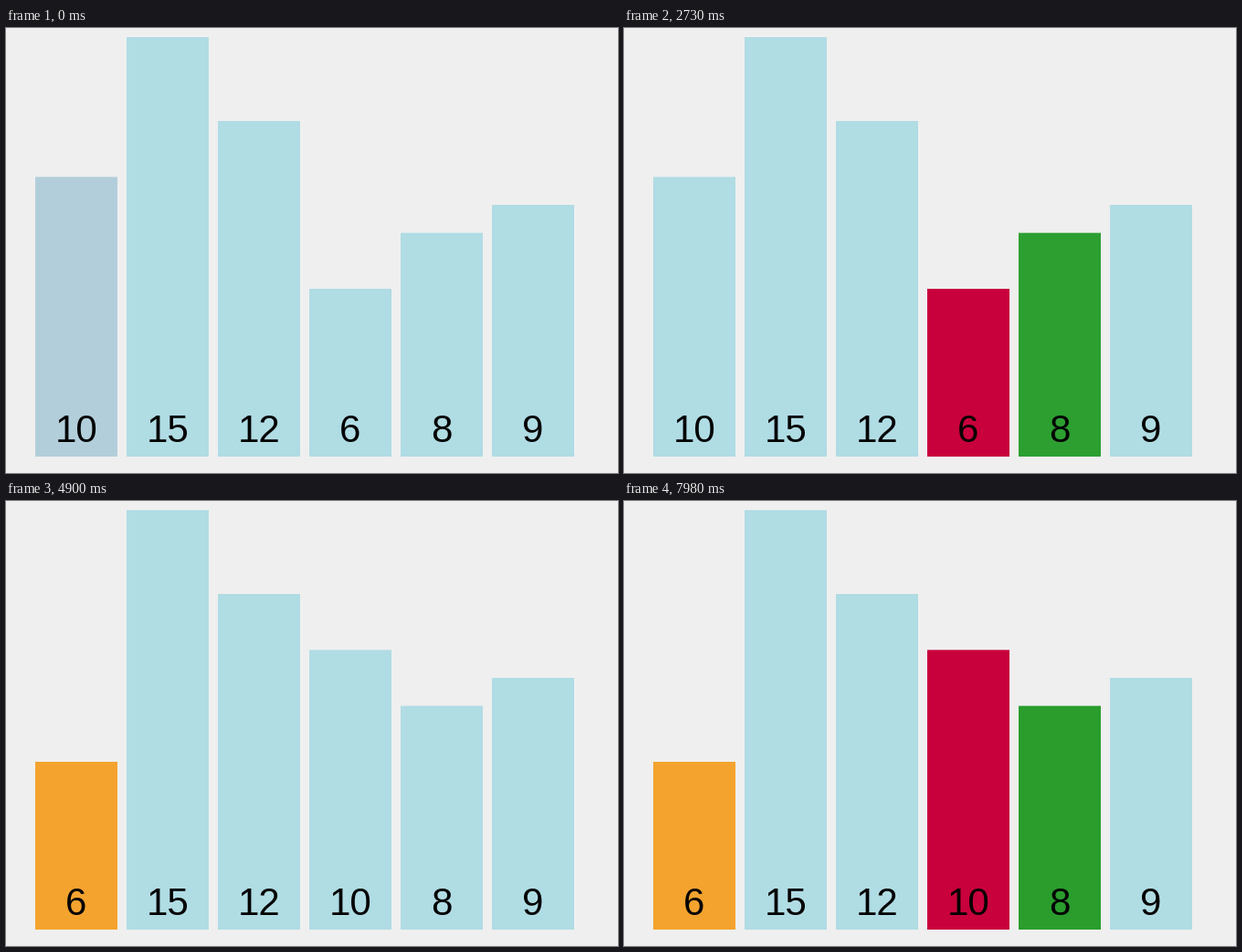
A matplotlib script that plays this animation: 670 by 488 pixels, repeating every 8000 ms.

```python
import matplotlib.pyplot as plt
from matplotlib.animation import FuncAnimation
from matplotlib.patches import Rectangle
import numpy as np

W, H, DPI = 670, 488, 100
LOOP, INTERVAL, TICK = 8000, 20, 70      # ms
STEP, FIRST, FADE = 524.7, -65, 260      # ms: step length, first step, transition

VALUES = [10, 15, 12, 6, 8, 9]
LEFT, PITCH, BAR_W, FLOOR, MAX_H = 32, 100, 90, 470, 460

BACKGROUND = "#efefef"
BLUE = np.array([176, 220, 228]) / 255
RED = np.array([200, 0, 60]) / 255
GREEN = np.array([20, 147, 15]) / 255
ORANGE = np.array([244, 163, 46]) / 255

# Each step of the selection sort recolours some bars (keyed by value).
COLOUR_STEPS = [
    {10: RED},
    {15: GREEN},
    {15: BLUE, 12: GREEN},
    {12: BLUE, 6: GREEN},
    {6: RED, 10: BLUE},
    {8: GREEN},
    {8: BLUE, 9: GREEN},
    {9: BLUE, 10: RED},
    {},                                  # the two red bars trade places
    {10: BLUE, 6: ORANGE},
    {15: RED},
    {12: GREEN},
    {12: RED, 15: BLUE},
    {10: GREEN},
    {10: RED, 12: BLUE},
    {8: GREEN},
]
SWAP_STEP = 8
SWAP = {10: 3, 6: 0}


def progress(t, step):
    """Cubic in-out progress of the transition that starts with a step."""
    p = np.clip((t - FIRST - step * STEP) / FADE, 0, 1)
    return 4 * p**3 if p < 0.5 else 1 - 4 * (1 - p)**3


def colour_at(value, t):
    colour = BLUE
    for step, changes in enumerate(COLOUR_STEPS):
        if value in changes:
            colour = colour + (changes[value] - colour) * progress(t, step)
    return colour


def left_at(value, t):
    slot = VALUES.index(value)
    slot += (SWAP.get(value, slot) - slot) * progress(t, SWAP_STEP)
    return LEFT + PITCH * slot


fig = plt.figure(figsize=(W / DPI, H / DPI), dpi=DPI, facecolor=BACKGROUND)
ax = fig.add_axes([0, 0, 1, 1])
ax.set(xlim=(0, W), ylim=(H, 0))
ax.axis("off")

bars, labels = {}, {}
for order, value in enumerate(VALUES):
    height = MAX_H * value / max(VALUES)
    bars[value] = ax.add_patch(Rectangle(
        (0, FLOOR - height), BAR_W, height, lw=0, snap=False, zorder=order + 1))
    labels[value] = ax.text(
        0, 454.5, str(value), family="Liberation Sans", fontsize=42 * 72 / DPI,
        color="black", ha="center", va="baseline", zorder=order + 1.5)


def draw(frame):
    t = (frame * INTERVAL + INTERVAL // 2) // TICK * TICK
    for value in VALUES:
        x = left_at(value, t)
        bars[value].set_x(x)
        bars[value].set_facecolor(colour_at(value, t))
        labels[value].set_x(x + BAR_W / 2)
    return [*bars.values(), *labels.values()]


anim = FuncAnimation(fig, draw, frames=LOOP // INTERVAL, interval=INTERVAL,
                     repeat=True, repeat_delay=0, blit=False)
plt.show()
```
